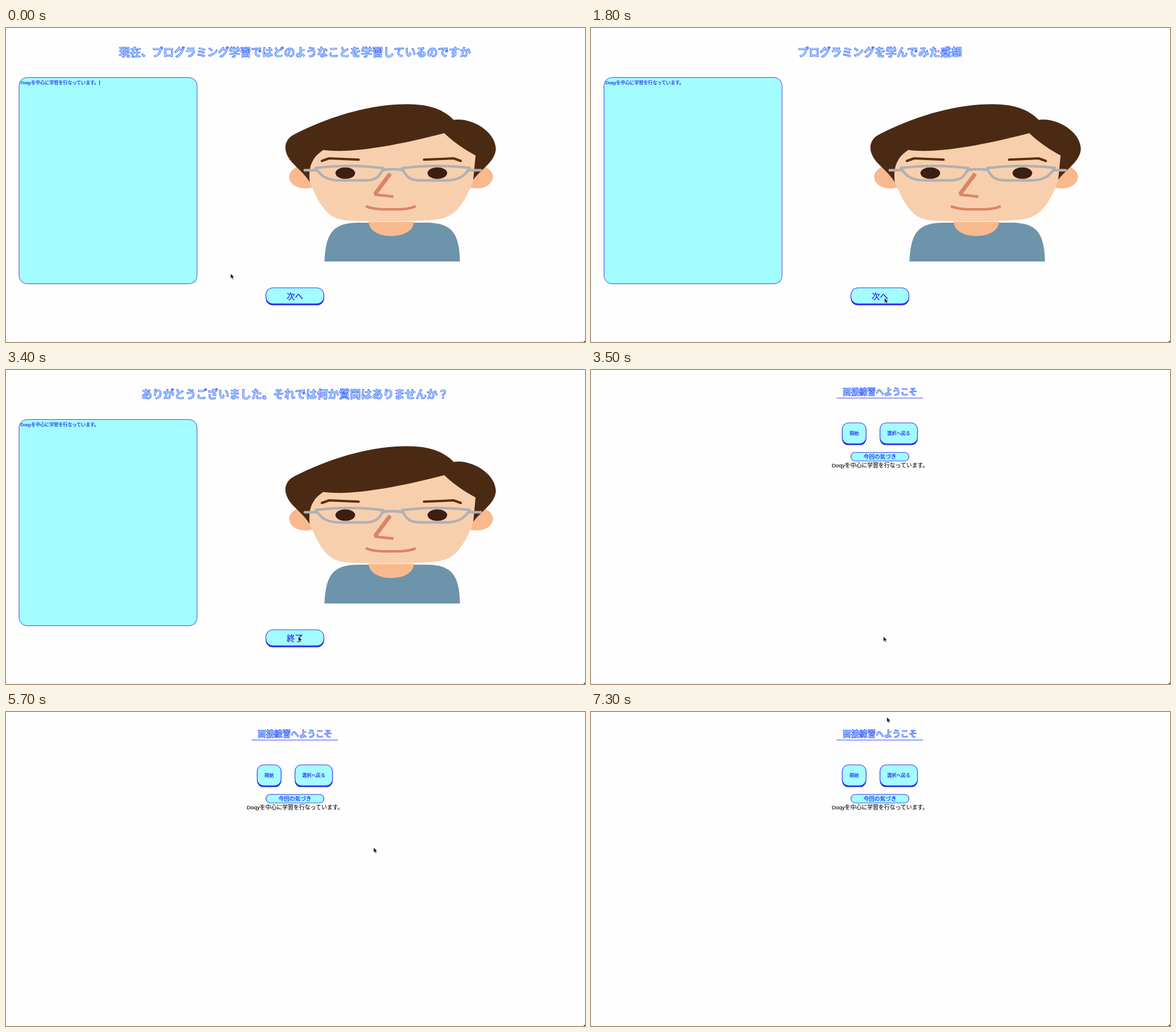
An HTML page that plays this animation: 1000 by 542 pixels, repeating every 7400 ms.

```html
<!DOCTYPE html>
<html lang="ja">
<head>
<meta charset="utf-8">
<title>面接練習</title>
<style>
  html, body { margin: 0; width: 100%; height: 100%; overflow: hidden; background: #fefefe; }
  svg { display: block; width: 100vw; height: 100vh; }
  text {
    font-family: "Liberation Sans", "Noto Sans CJK JP", "Noto Sans CJK", sans-serif;
    color: #1a14f0; fill: currentColor; stroke: currentColor; stroke-width: .15; text-anchor: middle;
  }
  .head { font-weight: 700; fill: #a6e4ff; stroke: #3040ff; stroke-width: .7; }
  .ink { color: #111; }
  .start { text-anchor: start; }
  .box { fill: #a3fdff; stroke: #3a30ee; stroke-width: .9; }
  .lip { fill: #2a20f0; }
  .line { fill: none; stroke-linecap: round; stroke-linejoin: round; }
</style>
</head>
<body>
<svg viewBox="0 0 1000 542" preserveAspectRatio="none">
  <rect width="1000" height="542" fill="#fefefe"/>
  <rect y="541" width="1000" height="1" fill="#efefef"/>
  <path d="M1000 539.5V542H997Z" fill="#333"/>

  <g id="interview">
    <rect class="box" x="22.5" y="85.5" width="307.5" height="356" rx="14"/>
    <path d="M324.5 440L329 435.5M327 440L329 438" stroke="#8a8ab0" stroke-width=".6"/>
    <path id="caret" d="M161.7 90.5V98.5" stroke="#222"/>

    <!-- shirt, ears, neck, skin, hair -->
    <path d="M550 403C552 352 566 336 610 336H725C768 336 783 352 784 403Z" fill="#6d94ab"/>
    <g fill="#f9b98f">
      <ellipse id="ear" cx="517" cy="257" rx="28" ry="20"/>
      <use href="#ear" x="296"/>
      <path d="M626 334.5H705C703 351 686 359 665.5 359S628 351 626 334.5Z"/>
    </g>
    <path d="M523 262L524 236L549 205L757 175L813 216L808 260C795 296 780 324 750 329.5C720 335 606 335 580 331C549 325 537 294 523 262Z" fill="#f8cfac"/>
    <path d="M524.5 266C516 252 504 243 494 232C478 214 478 193 499 183C562 151 632 131 695 131.5C736 132 758 143 773 158.5C806 154 846 180 846 209C845 231 818 246 807 262L811 220C789 208 772 196 757 181.5C690 199 600 218 548 210.5C528 224 522 240 524.5 266Z" fill="#4b2a14"/>

    <g id="eye">
      <ellipse cx="586" cy="250.5" rx="17" ry="10" fill="#3c1e12"/>
      <path class="line" d="M545.5 229.5L558 225L609 227.3" stroke="#5c2f10" stroke-width="4"/>
    </g>
    <use href="#eye" transform="matrix(-1 0 0 1 1331 0)"/>

    <g class="line" stroke="#b0b0b3" stroke-width="4.4">
      <path id="lens" d="M516 245.5H537M535 241.5C575 237 615 237 652 242C645 258 637 262.5 622 263H574C552 262.5 543 254 535 241.5Z"/>
      <use href="#lens" transform="matrix(-1 0 0 1 1336 0)"/>
      <path d="M652 245Q668 242.5 684 245"/>
    </g>
    <g fill="none" stroke="#da8468" stroke-width="4.4">
      <path d="M663.5 251.5L637 287" stroke-width="7"/>
      <path d="M636 287.5L669 291"/>
      <path d="M621.5 307.5C632 312.5 645 313 665 313S698 312.5 707.5 307.5"/>
    </g>
    <g id="next"></g>
  </g>

  <g id="welcome">
    <path d="M424 48.4H573.5" stroke="#3a30ee" stroke-width=".9"/>
  </g>

  <path id="cursor" d="M0 0V8.4L2 6.7L3.5 9.9L5 9.2L3.6 6.2H6.3Z" fill="#111" stroke="#fff" stroke-width=".5"/>
</svg>
<script>
const LOOP = 7400, STEP = 100, CENTER = 499;
const ANSWER = "Doqyを中心に学習を行なっています。";

const pages = [
  { from: 0, title: "現在、プログラミング学習ではどのようなことを学習しているのですか", action: "次へ" },
  { from: 1800, title: "プログラミングを学んでみた感想", action: "次へ" },
  { from: 2600, title: "ありがとうございました。それでは何か質問はありませんか？", action: "終了" }
];
const WELCOME_AT = 3500, CARET_OFF = 500;

// The pointer goes straight from stop to stop.
const stops = [
  { t: 0, x: 388, y: 424 },
  { t: 700, x: 438, y: 496 },
  { t: 1200, x: 475, y: 466 },
  { t: 1800, x: 507, y: 466 },
  { t: 2500, x: 508, y: 463 },
  { t: 3300, x: 505, y: 460 },
  { t: 3500, x: 505, y: 460 },
  { t: 4000, x: 555, y: 262 },
  { t: 4700, x: 627, y: 240 },
  { t: 5200, x: 385, y: 275 },
  { t: 5700, x: 635, y: 234 },
  { t: 6400, x: 530, y: 296 },
  { t: 7300, x: 511, y: 9 }
];

const $ = id => document.getElementById(id);

function add(parent, tag, attrs) {
  const el = document.createElementNS("http://www.w3.org/2000/svg", tag);
  for (const key in attrs) el.setAttribute(key, attrs[key]);
  return $(parent).appendChild(el);
}

// The em box of a kanji is centred 0.38em above the baseline.
function label(parent, str, x, cy, size, cls = "") {
  const el = add(parent, "text", { x, y: cy + size * 0.38, "font-size": size, class: cls });
  el.textContent = str;
  return el;
}

function panel(parent, x, y, width, height, rx, lip = 0) {
  const under = add(parent, "rect", {
    class: "lip", x: x - 0.45, y, width: width + 0.9, height: height + lip, rx
  });
  add(parent, "rect", { class: "box", x, y, width, height, rx });
  return under;
}

const nextLip = panel("next", 449, 448.5, 100, 27.5, 12, 2.6);
const action = label("next", "", CENTER, 462.5, 14.2);
const title = label("interview", "", CENTER, 41.5, 19, "head");
label("interview", ANSWER, 25, 94.3, 7.88, "start");

panel("welcome", 434, 91.2, 41, 36, 11, 2.4);
panel("welcome", 499.2, 91.2, 64.6, 36, 11, 2.4);
panel("welcome", 449, 142.2, 100, 14.8, 7.4);
label("welcome", "面接練習へようこそ", CENTER, 38, 14.3, "head");
label("welcome", "開始", 454.5, 109, 8);
label("welcome", "選択へ戻る", 531.5, 109, 8);
label("welcome", "今回の気づき", CENTER, 149.5, 9.5);
label("welcome", ANSWER, CENTER, 164.3, 9.7, "ink");

function pointerAt(t) {
  const i = Math.max(1, stops.findIndex(s => s.t >= t));
  const a = stops[i - 1], b = stops[i];
  const k = (t - a.t) / (b.t - a.t);
  return [a.x + (b.x - a.x) * k, a.y + (b.y - a.y) * k];
}

const show = (el, on) => { el.style.display = on ? "" : "none"; };
const move = (el, x, y) => el.setAttribute("transform", `translate(${x} ${y})`);

function draw(t) {
  const page = pages.findLast(p => t >= p.from);
  // The button is held down for one step before each new page.
  const pressed = pages.some(p => t === p.from - STEP);
  show($("interview"), t < WELCOME_AT);
  show($("welcome"), t >= WELCOME_AT);
  show($("caret"), t < CARET_OFF);
  show(nextLip, !pressed);
  move($("next"), 0, pressed ? 2 : 0);
  title.textContent = page.title;
  action.textContent = page.action;
  move($("cursor"), ...pointerAt(Math.min(t, stops.at(-1).t)));
}

const start = performance.now();
function tick() {
  const t = (performance.now() - start) % LOOP;
  draw(Math.floor(t / STEP) * STEP);
  requestAnimationFrame(tick);
}
tick();
</script>
</body>
</html>
```
